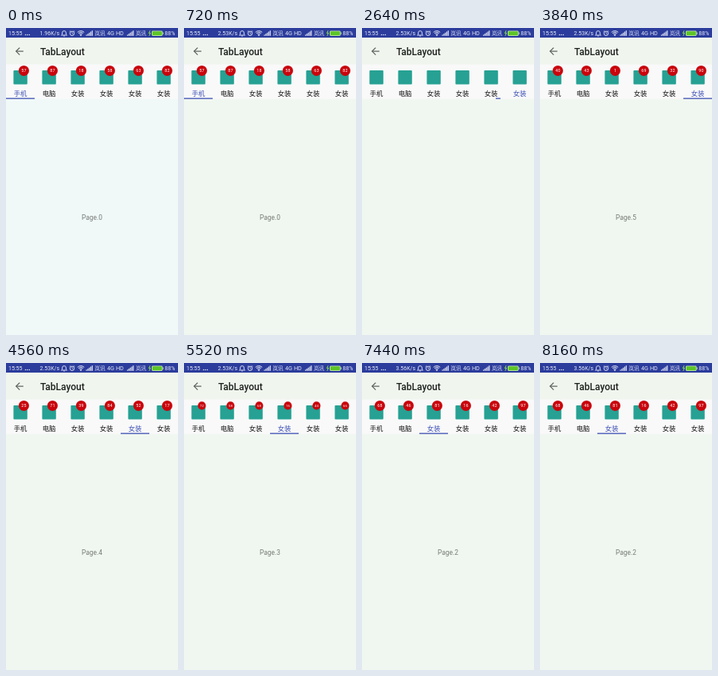
These frames come from a looping animation (216 by 384 pixels, 8400 ms). An HTML page with a canvas:

```html
<!DOCTYPE html>
<html lang="zh">
<head>
<meta charset="utf-8">
<title>TabLayout</title>
<style>
html, body { margin: 0; width: 100%; height: 100%; overflow: hidden; background: #f0f7f0; }
canvas { display: block; width: 100vw; height: 100vh; }
</style>
</head>
<body>
<canvas id="stage"></canvas>
<script>
const W = 216, H = 384, LOOP = 8400, STEP = 240, TAB = 36;
const SANS = 'Roboto, "Noto Sans CJK SC", "Noto Sans CJK", sans-serif';
const HAN = '"Noto Sans CJK SC", "Noto Sans CJK", sans-serif';
const ACCENT = '#3f51b5', PALE = '#e3e7f6', CARRIER = '岚讯';
const LABELS = ['手机', '电脑', '女装', '女装', '女装', '女装'];

// Each tap selects a page and draws fresh badge counts.
const TAPS = [
  { at: -1000, page: 0, counts: [57, 87, 18, 58, 63, 82] },
  { at: 1150, page: 1, counts: [46, 49, 48, 35, 14, 68] },
  { at: 2575, page: 5, counts: [40, 43, 1, 69, 32, 90] },
  { at: 3960, page: 4, counts: [25, 71, 39, 84, 52, 17] },
  { at: 5210, page: 3, counts: [72, 58, 68, 16, 44, 66] },
  { at: 6698, page: 2, counts: [68, 46, 81, 16, 42, 97] }
];

const canvas = document.getElementById('stage');
const ctx = canvas.getContext('2d');
const ratio = window.devicePixelRatio || 1;
canvas.width = W * ratio;
canvas.height = H * ratio;

const clamp = v => Math.max(0, Math.min(1, v));
const lerp = (a, b, k) => a + (b - a) * k;
const quintOut = k => 1 - Math.pow(1 - k, 5);

// cubic-bezier(.4, 0, .2, 1)
function fastOutSlowIn(x) {
  let lo = 0, hi = 1;
  for (let i = 0; i < 24; i++) {
    const s = (lo + hi) / 2, r = 1 - s;
    if (1.2 * r * r * s + 0.6 * r * s * s + s * s * s < x) lo = s; else hi = s;
  }
  return lo * lo * (3 - 2 * lo);
}

function rect(x, y, w, h, color) {
  ctx.fillStyle = color;
  ctx.fillRect(x, y, w, h);
}

function roundBox(x, y, w, h, r, color) {
  ctx.fillStyle = color;
  ctx.beginPath();
  ctx.roundRect(x, y, w, h, r);
  ctx.fill();
}

function disc(x, y, r, color) {
  ctx.fillStyle = color;
  ctx.beginPath();
  ctx.arc(x, y, r, 0, Math.PI * 2);
  ctx.fill();
}

function text(str, x, y, font, color, align = 'left') {
  ctx.font = font;
  ctx.fillStyle = color;
  ctx.textAlign = align;
  ctx.fillText(str, x, y);
}

function line(color, width, ...points) {
  ctx.strokeStyle = color;
  ctx.lineWidth = width;
  ctx.beginPath();
  points.forEach(([x, y], i) => i ? ctx.lineTo(x, y) : ctx.moveTo(x, y));
  ctx.stroke();
}

function arc(x, y, r, from, to, width = 0.9) {
  ctx.strokeStyle = PALE;
  ctx.lineWidth = width;
  ctx.beginPath();
  ctx.arc(x, y, r, from, to);
  ctx.stroke();
}

function signal(x) {
  for (let i = 0; i < 5; i++) {
    const h = 1.4 + i * 1.3;
    rect(x + i * 1.8, 9.8 - h, 1.2, h, PALE);
  }
}

function statusBar(t) {
  const speed = t < 480 ? '1.96' : t < 7440 ? '2.53' : '3.56';
  const font = '7px ' + SANS, small = '6.6px ' + HAN;
  rect(0, 0, W, 12, '#2b3c9c');
  text('15:55', 3, 9.4, font, PALE);
  for (let i = 0; i < 3; i++) disc(24.5 + i * 2.4, 8.4, 0.75, PALE);
  text(speed + 'K/s', 42.5, 9.4, font, PALE);

  // bell
  arc(73, 6, 2.4, Math.PI, 0);
  line(PALE, 0.9, [70.6, 6], [70.6, 8], [69.5, 9], [76.5, 9], [75.4, 8], [75.4, 6]);
  disc(73, 10, 0.7, PALE);
  // alarm clock
  arc(83, 6.8, 2.7, 0, Math.PI * 2);
  line(PALE, 0.7, [83, 5.2], [83, 7], [84.3, 7.6]);
  line(PALE, 0.8, [79.7, 4.6], [81.2, 3.4]);
  line(PALE, 0.8, [84.8, 3.4], [86.3, 4.6]);
  // wifi
  for (const r of [2.2, 4, 5.8]) arc(94, 9.4, r, -Math.PI * 0.76, -Math.PI * 0.24, 1);
  disc(94, 9.2, 0.9, PALE);

  signal(100.5);
  text(CARRIER, 111.5, 9.2, small, PALE);
  text('4G HD', 127, 9.4, '7.3px ' + SANS, PALE);
  signal(152);
  text(CARRIER, 163, 9.2, small, PALE);
  line('#8be04a', 1, [181, 3.2], [179.4, 6.6], [181.6, 6.2], [179.8, 9.8]);
  roundBox(183, 3.4, 13.6, 6.6, 1.4, '#c9e8b6');
  roundBox(183.8, 4.2, 12, 5, 0.8, '#5cc427');
  rect(196.6, 5.4, 1, 2.6, '#c9e8b6');
  text('88%', 199.3, 9.4, font, PALE);
}

function toolbar() {
  rect(0, 12, W, 33.6, '#f0f6ee');
  const gray = '#5c5f5c';
  line(gray, 1.2, [12.6, 29.1], [21.8, 29.1]);
  line(gray, 1.2, [17.2, 24.6], [12.7, 29.1], [17.2, 33.6]);
  text('TabLayout', 43, 33.5, '500 12px ' + SANS, '#1e211e');
}

function indicator(from, to, age) {
  const k = fastOutSlowIn(clamp(age / 300));
  const end = to * TAB;
  let left = from * TAB, right = left + TAB;
  // Distant tabs grow the bar from a point just beside the new tab.
  if (Math.abs(to - from) > 1) {
    left = right = to > from ? end - 14.4 : end + TAB + 14.4;
  }
  left = lerp(left, end, k);
  right = lerp(right, end + TAB, k);
  rect(left, 87.5, right - left, 1.3, ACCENT);
}

function tabs(tap, from, age) {
  rect(0, 45.6, W, 43.2, '#f9f9f9');
  const scale = clamp(age / 400);
  LABELS.forEach((label, i) => {
    const x = i * TAB + 18;
    roundBox(x - 8.6, 53, 17.4, 17.4, 1, '#26a193');
    if (scale > 0.2) {
      const bx = x + 4.4, by = 53.4;
      disc(bx, by, 6.5 * scale, '#c9040c');
      text(tap.counts[i], bx, by + 1.95 * scale, `${5.4 * scale}px ${SANS}`, '#fff', 'center');
    }
    text(label, x, 85, '8.4px ' + HAN, i === tap.page ? ACCENT : '#161616', 'center');
  });
  indicator(from, tap.page, age);
}

function pages(tap, from, age) {
  const time = Math.min(600, (Math.abs(tap.page - from) + 1) * 100);
  const pos = lerp(from, tap.page, quintOut(clamp(age / time)));
  for (let p = Math.max(0, tap.page - 1); p <= Math.min(5, tap.page + 1); p++) {
    text('Page.' + p, W / 2 + (p - pos) * W, 240, '8.4px ' + SANS, '#777a77', 'center');
  }
}

function draw(t) {
  let n = TAPS.length - 1;
  while (TAPS[n].at > t) n--;
  const tap = TAPS[n], from = n ? TAPS[n - 1].page : 0, age = t - tap.at;
  ctx.setTransform(canvas.width / W, 0, 0, canvas.height / H, 0, 0);
  rect(0, 0, W, H, t < STEP ? '#f0f9f8' : '#f0f7f0');
  pages(tap, from, age);
  toolbar();
  tabs(tap, from, age);
  statusBar(t);
}

const start = performance.now();
function tick(now) {
  const t = Math.max(0, now - start) % LOOP;
  draw(Math.floor(t / STEP) * STEP);
  requestAnimationFrame(tick);
}
draw(0);
requestAnimationFrame(tick);
</script>
</body>
</html>
```
